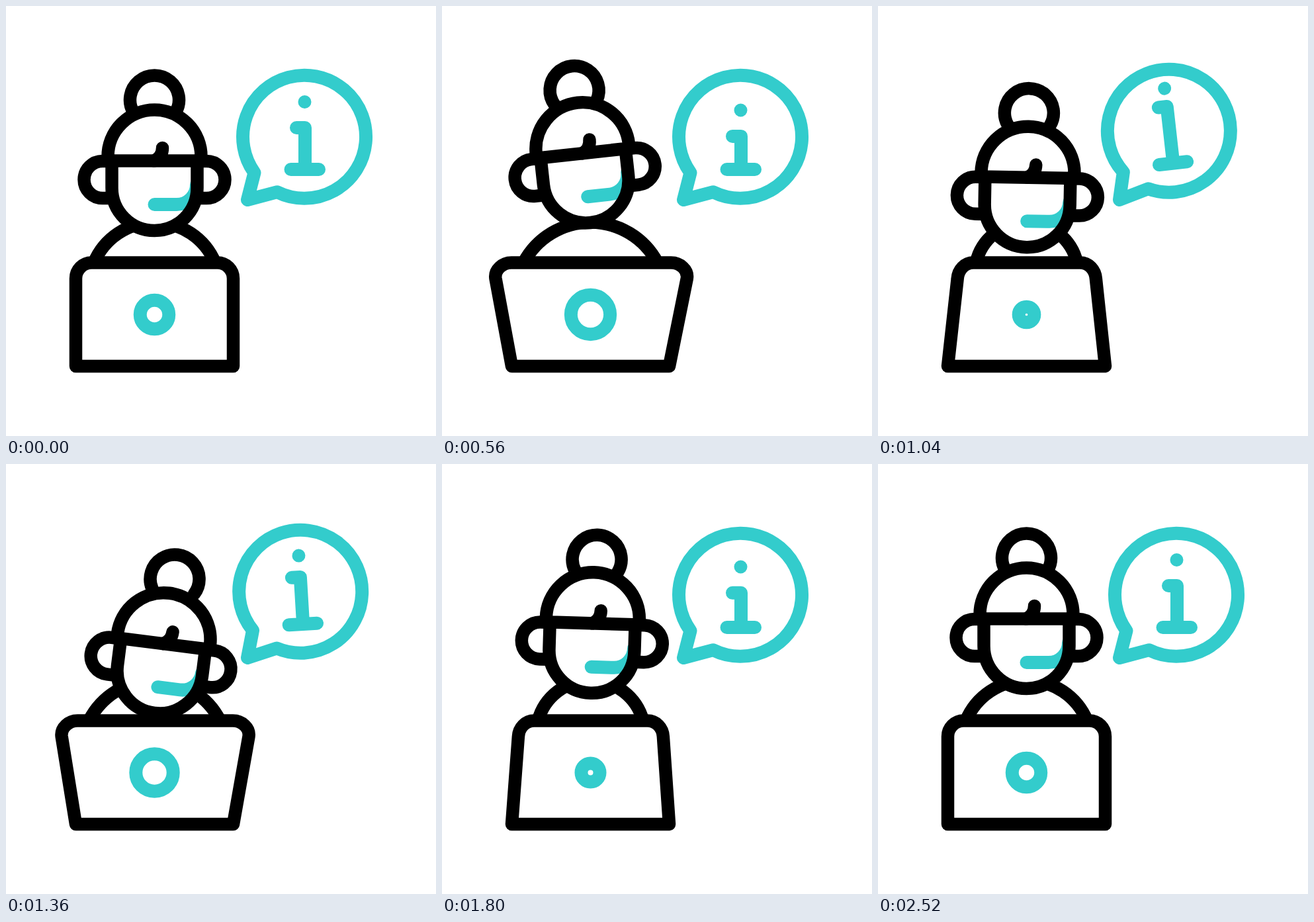
An HTML page for the animation above (2.88 s loop, 650 by 650 pixels).

```html
<!DOCTYPE html>
<html lang="en">
<head>
<meta charset="utf-8">
<title>Help desk</title>
<style>
  html, body { margin: 0; width: 100%; height: 100%; overflow: hidden; background: #fff; }
  svg { display: block; width: 100vw; height: 100vh; }
  .ink, .teal { stroke-linecap: round; stroke-linejoin: round; fill: none; }
  .ink { stroke: #000; stroke-width: 19.5; }
  .teal { stroke: #33cccc; stroke-width: 20; }
  .white { fill: #fff; }
  .dot { fill: #33cccc; }
</style>
</head>
<body>
<svg viewBox="0 0 650 650">
  <path id="shoulders" class="ink"/>
  <g id="head">
    <path id="bun" class="ink white" d="M192.5 160.5A37 37 0 1 1 256.5 160.5"/>
    <path class="ink white" d="M160 234.5H146A28 28 0 0 0 146 290.5H158"/>
    <path class="ink white" d="M289 234.5H303A28 28 0 0 1 303 290.5H291"/>
    <path class="white" d="M160 234H289V275A64.5 64.5 0 0 1 160 275Z"/>
    <path class="teal" d="M224.5 300H258A30 30 0 0 0 288 270"/>
    <path class="ink" d="M160 234V275A64.5 64.5 0 0 0 289 275V234"/>
    <path class="ink white" d="M154 234V227.5A70.5 70.5 0 0 1 295 227.5V234Z"/>
    <path class="ink" d="M236.5 214.5Q236.5 228 224 234"/>
  </g>
  <path id="laptop" class="ink white"/>
  <circle id="ring" class="teal" cx="224.5" cy="466.5"/>
  <g id="bubble">
    <path class="teal" d="M410 281.2A93 93 0 1 0 375.5 252L365 293Z"/>
    <circle id="dot" class="dot" cx="451.5" cy="145" r="10"/>
    <path id="stem" class="teal"/>
  </g>
</svg>
<script>
const LOOP = 2880, STEP = 40, START = 40, MIDDLE = 1115;

const set = (id, name, value) => document.getElementById(id).setAttribute(name, value);

// Sine ease from 0 to 1 between two times.
function ease(t, from, to) {
  const p = Math.min(1, Math.max(0, (t - from) / (to - from)));
  return (1 - Math.cos(Math.PI * p)) / 2;
}

// Goes from rest to pose a, swings between a and b, then returns to rest from b,
// or from a when the number of turns is odd. Returns a function mixing the offsets.
function beat(t, first, half, turns, end) {
  const last = first + half * (turns - 1);
  const swing = (1 - Math.cos(Math.PI * (Math.min(last, Math.max(first, t)) - first) / half)) / 2;
  const amount = ease(t, START, first) - ease(t, last, end);
  return (a, b) => amount * (a + (b - a) * swing);
}

function laptopPath(l, r) {
  const lx = 105.5 + l, rx = 343.5 + r;
  return `M105.5 544.5L${lx} 412C${lx + l * .08} 398.7 ${lx + 10.7} 388 ${lx + 24} 388` +
    `H${rx - 24}C${rx - 10.7} 388 ${rx + r * .08} 398.7 ${rx} 412L343.5 544.5Z`;
}

// Circular arc of fixed height over a changing base.
function shoulderPath(half) {
  const rise = 61, r = (half * half + rise * rise) / (2 * rise);
  return `M${224.5 - half} 388A${r} ${r} 0 0 1 ${224.5 + half} 388`;
}

function draw(t) {
  const tilt = beat(t, 620, 800, 2, 1980)(-6.4, 7.4);
  const lift = beat(t, 570, 710, 2, 2000)(-12, 38);
  set('head', 'transform', `translate(0 ${lift}) rotate(${tilt} 224.5 339)`);

  const bun = beat(t, 720, 760, 2, 2260);
  set('bun', 'transform', `translate(${bun(-3, 5.5)} ${bun(-4.5, -7.2)})`);

  const lid = beat(t, 522, 465, 4, 2520);
  set('laptop', 'd', laptopPath(lid(-25.2, 16), lid(27.5, -15.5)));
  set('ring', 'r', 21.75 + lid(8.2, -10.5));
  set('shoulders', 'd', shoulderPath(91.5 + lid(10, -16)));

  // The bubble's rocking is symmetric about the middle of the action.
  const away = Math.abs(t - MIDDLE);
  const rock = -6.4 + 10.4 * ease(away, 155, 405) - 4 * ease(away, 405, 540);
  set('bubble', 'transform', `rotate(${rock} 365 293)`);

  const hop = beat(t, 590, 525, 3, 2240);
  set('dot', 'cy', 145 + hop(12.6, -13));
  set('stem', 'd', `M439 ${184 + hop(13, -25)}H452V247M430.5 247H473`);
}

const start = performance.now();
function tick() {
  const t = (performance.now() - start) % LOOP;
  draw(Math.floor(t / STEP) * STEP);
  requestAnimationFrame(tick);
}
tick();
</script>
</body>
</html>
```
